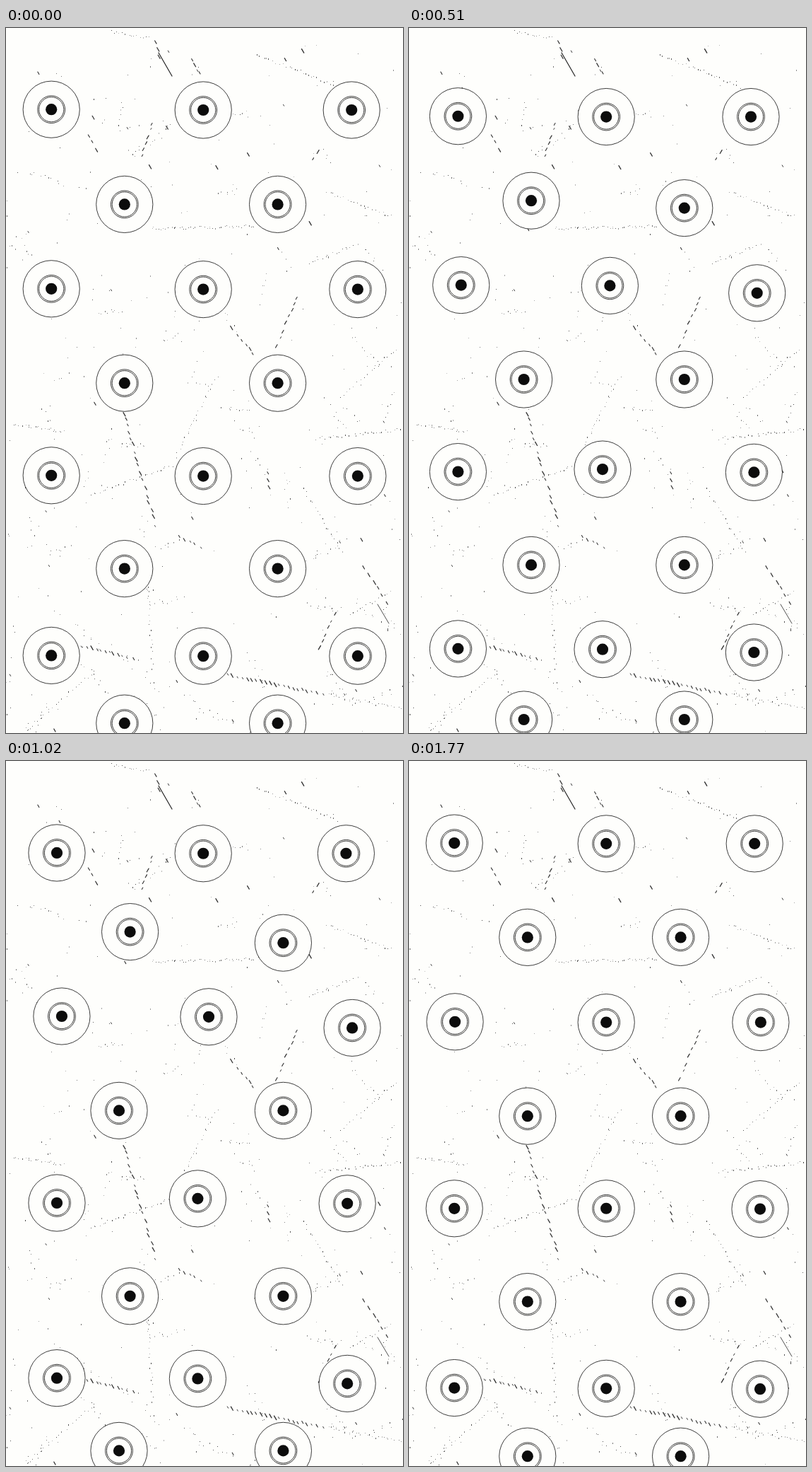
Animation of 562x997 px, one loop 1800 ms. Source, as an HTML page with a canvas:

```html
<!DOCTYPE html>
<html lang="en">
<head>
<meta charset="utf-8">
<title>Drifting rings</title>
<style>
html, body { margin: 0; width: 100%; height: 100%; overflow: hidden; background: #fefefc; }
canvas { display: block; width: 562px; height: 997px; }
</style>
</head>
<body>
<canvas id="stage" width="562" height="997"></canvas>
<script>
const W = 562, H = 997, PAPER = '#fefefc', INK = '#0c0c0c';
const LOOP = 1800, STEP = 30;
const UNIT = W / 648;   // drift moves in whole layout units
const DRIFT = 10;
const ctx = document.getElementById('stage').getContext('2d');

// Rows alternate three and two rings; each ring has its own drift [x, y].
const wide = [64.2, 279.2, 497.9], narrow = [167.8, 384.6];
const rows = [
  { y: 115.2, xs: [64.2, 279.2, 489.2], drift: [[1, 2], [0, 2], [-1, 2]] },
  { y: 249.4, xs: narrow, drift: [[1, -1], [1, 1]] },
  { y: 368.8, xs: wide, drift: [[2, -1], [1, -1], [-1, 1]] },
  { y: 502.2, xs: narrow, drift: [[-1, -1], [1, -1]] },
  { y: 632.8, xs: wide, drift: [[1, -1], [-1, -2], [-2, -1]] },
  { y: 764.6, xs: narrow, drift: [[1, -1], [1, -1]] },
  { y: 887.4, xs: wide, drift: [[1, -2], [-1, -2], [-2, -1]] },
  { y: 983.2, xs: narrow, drift: [[-1, -1], [1, -1]] }
];
const rings = rows.flatMap(({ y, xs, drift }) => xs.map((x, i) => ({
  x, y: y + (xs.length > 2 && i > 0 ? 0.8 : 0), dx: drift[i][0], dy: drift[i][1]
})));

// Main cracks in the paper, from point to point.
const cracks = [
  [211, 20, 219, 44], [264, 44, 273, 63], [207, 136, 190, 186], [118, 154, 131, 180],
  [320, 424, 354, 466], [167, 546, 214, 711], [245, 720, 268, 729], [314, 915, 455, 943],
  [108, 874, 183, 892], [465, 828, 442, 880], [412, 382, 380, 455], [441, 174, 431, 194],
  [371, 630, 374, 655], [507, 762, 540, 815]
];
const hairlines = [
  [148, 5, 205, 14], [355, 38, 465, 80], [165, 104, 159, 148], [205, 283, 355, 280],
  [453, 231, 545, 266], [428, 333, 498, 304], [298, 491, 240, 606], [474, 522, 553, 452],
  [12, 560, 85, 571], [120, 660, 235, 618], [440, 580, 562, 567], [420, 650, 478, 746],
  [488, 828, 546, 794], [200, 775, 207, 912], [455, 942, 560, 962], [30, 992, 128, 906]
];

function seeded(s) {
  return () => {
    s = (s + 0x6d2b79f5) | 0;
    let t = Math.imul(s ^ (s >>> 15), 1 | s);
    t = (t + Math.imul(t ^ (t >>> 7), 61 | t)) ^ t;
    return ((t ^ (t >>> 14)) >>> 0) / 4294967296;
  };
}
const rnd = seeded(41);
const vary = a => (rnd() - 0.5) * 2 * a;

function line(g, x1, y1, x2, y2, width) {
  g.lineWidth = width;
  g.beginPath();
  g.moveTo(x1, y1);
  g.lineTo(x2, y2);
  g.stroke();
}

// Calls mark(x, y, lean) at loose intervals along a trail.
function along([x1, y1, x2, y2], gap, spread, mark) {
  const dx = x2 - x1, dy = y2 - y1, len = Math.hypot(dx, dy);
  const lean = dx * dy < 0 && Math.abs(dy) > Math.abs(dx) ? -1 : 1;
  const step = gap * (1 + Math.abs(dy) / len);
  for (let d = 0; d <= len; d += step * (0.7 + rnd() * 0.6))
    mark(x1 + dx * d / len + vary(spread), y1 + dy * d / len + vary(spread), lean);
}

function paintPaper() {
  const c = document.createElement('canvas');
  c.width = W;
  c.height = H;
  const g = c.getContext('2d');
  g.fillStyle = PAPER;
  g.fillRect(0, 0, W, H);
  g.fillStyle = g.strokeStyle = INK;
  g.lineCap = 'round';

  const dash = (x, y, lean) => {
    const len = 2 + rnd() * 4.5;
    g.globalAlpha = 0.85;
    line(g, x - len * 0.25 * lean, y - len * 0.43, x + len * 0.25 * lean, y + len * 0.43,
      0.7 + len * 0.1);
  };
  const dot = (x, y) => {
    g.globalAlpha = 0.25 + rnd() * 0.5;
    g.fillRect(Math.round(x), Math.round(y), 1, rnd() < 0.3 ? 2 : 1);
  };

  cracks.forEach(t => along(t, 5.5, 1.2, dash));
  hairlines.forEach(t => along(t, 3.5, 2, dot));
  for (let i = 0; i < 75; i++) {
    const x = rnd() * W, y = H * Math.pow(rnd(), 0.75);
    const a = rnd() * Math.PI, len = 15 + rnd() * 40;
    along([x, y, x + len * Math.cos(a), y + len * Math.sin(a)], 4, 4, dot);
  }
  for (let i = 0; i < 260; i++) dot(rnd() * W, 20 + rnd() * H);
  for (let i = 0; i < 40; i++) dash(rnd() * W, 20 + rnd() * H, 1);

  g.globalAlpha = 0.9;
  line(g, 216, 35, 235, 68, 1.2);
  line(g, 526, 815, 542, 842, 0.8);
  return c;
}
const paper = paintPaper();

function circle(x, y, r) {
  ctx.beginPath();
  ctx.arc(x, y, r, 0, Math.PI * 2);
}

function drawRing(x, y) {
  circle(x, y, 40.1);
  ctx.fillStyle = PAPER;
  ctx.fill();
  ctx.stroke();
  for (const r of [19.4, 17.6]) {
    circle(x, y, r);
    ctx.stroke();
  }
  circle(x, y, 8.1);
  ctx.fillStyle = INK;
  ctx.fill();
}

function draw() {
  const t = Math.floor((performance.now() % LOOP) / STEP) * STEP;
  const k = (1 - Math.abs(1 - t / (LOOP / 2))) * DRIFT;
  const shift = d => Math.round(d * k) * UNIT;
  ctx.drawImage(paper, 0, 0);
  ctx.strokeStyle = INK;
  ctx.lineWidth = 0.8;
  for (const { x, y, dx, dy } of rings) drawRing(x + shift(dx), y + shift(dy));
  requestAnimationFrame(draw);
}
draw();
</script>
</body>
</html>
```
